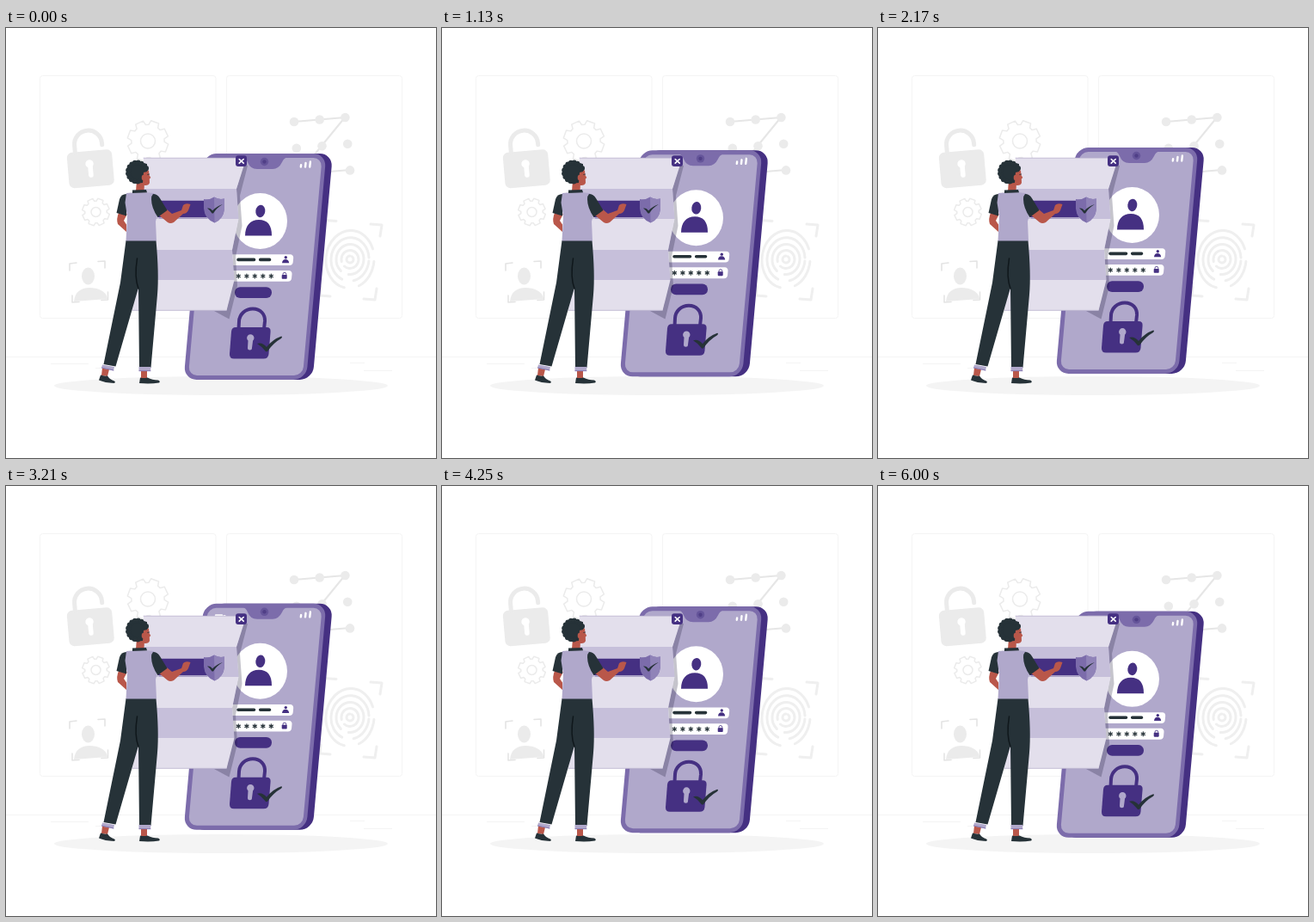
An HTML page that plays this animation: 500x500 px, repeating every 6.04 s.

```html
<!DOCTYPE html>
<html lang="en">
<head>
<meta charset="utf-8">
<title>Secure login</title>
<style>
html, body { margin: 0; width: 100%; height: 100%; overflow: hidden; background: #fff; }
svg { display: block; width: 100vw; height: 100vh; }
.line { fill: none; stroke-linecap: round; stroke-linejoin: round; }
.deep { fill: #453082; }
.mid { fill: #7c6cab; }
.lilac { fill: #b0a8cb; }
.ink { fill: #263238; }
.skin { fill: #b9574a; }
.pale { fill: #ebebeb; }
</style>
</head>
<body>
<svg viewBox="0 0 500 500">
  <!-- backdrop -->
  <g fill="#fff" stroke="#f4f4f4">
    <rect x="39.5" y="55.5" width="204.500" height="282" rx="3"/>
    <rect x="256.500" y="55.5" width="204" height="282" rx="3"/>
    <path d="M0 382.500H500M400 389.500h17M416 398.500h33M52 390.500h44M104 395.500h10"/>
  </g>
  <ellipse cx="250" cy="416" rx="194" ry="11" fill="#f4f4f4"/>

  <g transform="rotate(-5 98 163)">
    <rect class="pale" x="72" y="143" width="52.500" height="41.500" rx="6"/>
    <path class="line" d="M82 144V135a16 16 0 0 1 32 0V137" stroke="#ebebeb" stroke-width="5" stroke-linecap="butt"/>
    <path d="M94 161a4.700 4.700 0 1 1 7 0V171a2.800 2.800 0 0 1-5.600 0V162Z" fill="#fff"/>
  </g>
  <g id="gears" class="line" stroke="#ebebeb" stroke-width="1.500"></g>
  <g class="pale">
    <ellipse cx="95.500" cy="288.500" rx="7.500" ry="10"/>
    <path d="M79 318C80 307 87 302 97 302S117 306 118 315Z"/>
  </g>
  <g class="line" stroke="#e4e4e4" stroke-width="1.600" stroke-linecap="butt">
    <path d="M74 282V274l8-1M107 271.500l8-.5V279M77 311v8l8-.5M111 316.500l7.500-.5V307"/>
  </g>
  <g class="line" stroke="#e6e6e6" stroke-width="2">
    <path d="M335 109L394 104L340 170L400 165"/>
  </g>
  <g id="dots" class="pale"></g>
  <g class="line" stroke="#efefef" stroke-width="3" stroke-linecap="butt">
    <path d="M424 228l13 1-2 13M431 303l-2 13-13-1M384 224.500l-13-1-1 11M366 301l-1 10 12 1"/>
    <g id="print" transform="rotate(5 400 269)" stroke-linecap="round"></g>
  </g>

  <!-- phone -->
  <g id="phone">
    <g transform="skewX(-5.090)">
      <rect class="deep" x="252" y="146" width="141" height="263" rx="15"/>
      <rect class="mid" x="243" y="146" width="142.500" height="263" rx="15"/>
      <rect class="lilac" x="248" y="151" width="133" height="253" rx="10"/>
    </g>
    <path class="mid" d="M275 150Q279 151 281 156Q284 164 292 164H310Q317 164 321 156Q323 151 328 150Z"/>
    <circle cx="300.500" cy="155.500" r="4.700" fill="#65559a"/>
    <circle cx="300.500" cy="155.500" r="2.200" fill="#503f87"/>
    <g class="line" stroke="#fff" stroke-width="2.400">
      <path d="M342.800 161.500l.3-2.300M348 161.500l.5-4.500M353.200 161.500l.7-6"/>
      <path d="M244 159.700h7M253.500 160.500h1"/>
    </g>
    <ellipse cx="295.500" cy="224.500" rx="31.500" ry="32.500" fill="#fff"/>
    <ellipse class="deep" cx="295.800" cy="213" rx="5.500" ry="7.300" transform="rotate(7 296 213)"/>
    <path class="deep" d="M278 241.500C278 230 284 223 294 223C304 223 309 229 309 241.500Z"/>
    <g transform="skewX(-5.090)">
      <rect x="280" y="263.300" width="78" height="12.800" rx="4" fill="#fff"/>
      <rect x="280" y="282" width="78" height="12.800" rx="4" fill="#fff"/>
    </g>
    <path class="line" d="M270 269.400H288.500M295.700 269.400H306.500" stroke="#263238" stroke-width="3.600"/>
    <circle class="deep" cx="325.300" cy="266.800" r="1.700"/>
    <path class="deep" d="M321 273.200Q321.500 269 325 269T329.200 273.200Z"/>
    <g id="stars" class="line" stroke="#263238" stroke-width="1.200"></g>
    <rect class="deep" x="320.700" y="287" width="6" height="4.800" rx=".8"/>
    <path class="line" d="M322 287.500v-1.300a1.900 1.900 0 0 1 3.800 0v1.300" stroke="#453082" stroke-width=".8"/>
    <rect class="deep" x="266" y="301.200" width="43" height="12.800" rx="6.200"/>
    <path class="line" d="M270.500 350L271 341C271.500 333 278 326.500 287 326.500S301.500 333 301 341L300 350" stroke="#453082" stroke-width="4"/>
    <path class="deep" d="M267 348H303Q308 348 307.600 353L305.500 379Q305 384.500 299.500 384.500H265Q259.700 384.500 260 379L262 353Q262.500 348 267 348Z"/>
    <path class="lilac" d="M281.500 363.500a4.200 4.200 0 1 1 5.600 0L286 372a2.500 2.500 0 0 1-5 0Z"/>
    <path class="ink" d="M292 367Q298 365 303 371Q310 362 320 358.500Q322 359 320 361Q311 366 304 376Q302 377 301 375Q297 370 292 367Z"/>
  </g>

  <!-- unfolded sheet -->
  <path d="M279 160H281L272 195L274.500 230L267 266L269 300L259.500 338.500L242 329H256L265 293L263 258L270 222L268 187L276 160Z" fill="#1b1535" opacity=".25"/>
  <path d="M160 151H279.500L268 187H158Z" fill="#e3dfec"/>
  <path d="M158 187H268L270.500 222H155Z" fill="#c6bfda"/>
  <path d="M155 222H270.500L263 258H153Z" fill="#e3dfec"/>
  <path d="M153 258H263L265.500 293H150Z" fill="#c6bfda"/>
  <path d="M150 293H265.500L256.500 328.500H147Z" fill="#e3dfec"/>
  <path class="line" d="M160 151.200H279M147 328.300H256" stroke="#b5aecb" stroke-width=".7"/>
  <rect class="deep" x="267" y="148.300" width="13" height="12.700" rx="3"/>
  <path class="line" d="M271.200 152.500l5 4.600m0-4.600l-5 4.600" stroke="#fff" stroke-width="1.600"/>
  <path d="M178 219H234V222H178Z" fill="#aaa1c6"/>
  <rect class="deep" x="176" y="200.700" width="60" height="19.300" rx="1"/>
  <path class="mid" d="M230 199Q237 200 242 196.500Q247 200 254 198.500V210Q253 222 242.500 226.500Q231 222 230 210Z"/>
  <path d="M242 196.500Q247 200 254 198.500V210Q253 222 242.500 226.500Z" fill="#9083b8"/>
  <path class="ink" d="M234 209.500Q238 209 240 212.500Q245 207 252 205Q245 209 241 215.500H239.500Q237 211.500 234 209.500Z"/>

  <!-- person -->
  <path class="skin" d="M131 215Q128 222 130 228L140 237V228.500L137 224L141 216ZM112 395L120 397L118 405L111 404ZM157 396H164V408H157Z"/>
  <path class="skin" d="M177 217L187 211L193 216L204 212L206 206Q209 203 214.500 205L212 212Q210 216 206 216L195 226Q191 228 188 226Z"/>
  <path class="ink" d="M140 193Q134 193 132 199L128.500 215L140 218.500Z"/>
  <path class="ink" d="M139.500 247H174.500Q178 285 176 310L168.500 395H155L154 302L127.500 393.500L113.500 391L133 296Z"/>
  <path class="line" d="M152.500 268Q149 290 154 303" stroke="#0f171b" stroke-width="1.500"/>
  <path class="lilac" d="M140 192Q157 190 172 192L176.500 215L174 225L175 247.500H139.500L141 219L138.500 203Z"/>
  <path class="ink" d="M171 193Q176 193 179 198L187.500 212L176.500 220Q169 209 169 199Q169 195 171 193Z"/>
  <path class="skin" d="M152 177L161 179L160.500 190H151Z"/>
  <path class="ink" d="M147 188.500L163 188L164 191.300L147 192Z"/>
  <path class="skin" d="M157 166L166 165.500L166.500 171L168.300 174L166.800 175.500L167 180Q166 183.500 161 183L154 180Z"/>
  <g id="hair" class="ink"></g>
  <ellipse class="skin" cx="160" cy="174" rx="2.300" ry="3.300"/>
  <path class="line" d="M164.700 170.500l2-.5" stroke="#263238" stroke-width=".8"/>
  <g class="lilac">
    <path d="M112 391.500L126 394L125 398.500L111 395.500Z"/>
    <path d="M154.500 394H168.500L168 399H154.500Z"/>
  </g>
  <path class="line" d="M111.500 395L125 398M155 398.700H168" stroke="#7c6cab" stroke-width=".8"/>
  <path class="ink" d="M110 403.500Q114 405 118 404.500Q121 409 126 410.500Q128 412 125.500 413Q115 412.500 108 409.500Z"/>
  <path class="ink" d="M156 406.500Q160 407.500 164.500 406.500Q170 409.500 177 409.500Q180 411 178 412.500Q168 414 155 413Z"/>
</svg>
<script>
const LOOP = 6040, RISE = 9.8;
const el = id => document.getElementById(id);
const fill = (id, items) => el(id).innerHTML = items.join('');
const range = n => [...Array(n).keys()];
const polar = (x, y, r, a) => `${x + r * Math.cos(a)} ${y + r * Math.sin(a)}`;

function gear(x, y, r, hole) {
  const teeth = range(8).flatMap(i =>
    [[-.3, .8], [-.2, 1], [.2, 1], [.3, .8]].map(([a, k]) =>
      polar(x, y, r * k, i * Math.PI / 4 + .35 + a)));
  return `<path d="M${teeth.join('L')}Z"/><circle cx="${x}" cy="${y}" r="${hole}"/>`;
}

fill('gears', [gear(165, 131.5, 24, 8.5), gear(104.5, 214, 16, 5.5)]);

fill('dots', range(9).map(i => {
  const col = i % 3, row = Math.floor(i / 3);
  return `<circle cx="${335 + col * 29.7 + row * 2.8}" cy="${109 - col * 2.5 + row * 30.7}" r="5.300"/>`;
}));

fill('print', range(5).map(i => {
  const r = 4 + i * 6, ry = r * (1 + i * .05), len = 2 * Math.PI * r;
  return `<ellipse cx="400" cy="269" rx="${r}" ry="${ry}"
    stroke-dasharray="${len * .72} ${len * .1}" stroke-dashoffset="${i * 23}"/>`;
}));

fill('stars', [270.3, 279.9, 289.3, 298.8, 308.3].map(x =>
  range(3).map(i => {
    const a = Math.PI / 2 + i * Math.PI / 3;
    return `<path d="M${polar(x, 288.5, 2.4, a)}L${polar(x, 288.5, -2.4, a)}"/>`;
  }).join('')));

fill('hair', [
  '<path d="M143 163L152 156L164 158L164 167L160 168L159 180L150 181L142 174Z"/>',
  ...range(13).map(i => {
    const a = 1.5 + i * .37;
    return `<circle cx="${152.5 + 10.5 * Math.cos(a)}" cy="${167.5 + 11 * Math.sin(a)}" r="3"/>`;
  }),
  '<circle cx="163" cy="163" r="3"/>'
]);

function draw(now) {
  const p = now % LOOP / LOOP;
  const lift = RISE * (1 - Math.abs(1 - 2 * p));
  el('phone').setAttribute('transform', `translate(0 ${-lift})`);
  requestAnimationFrame(draw);
}
draw(performance.now());
</script>
</body>
</html>
```
